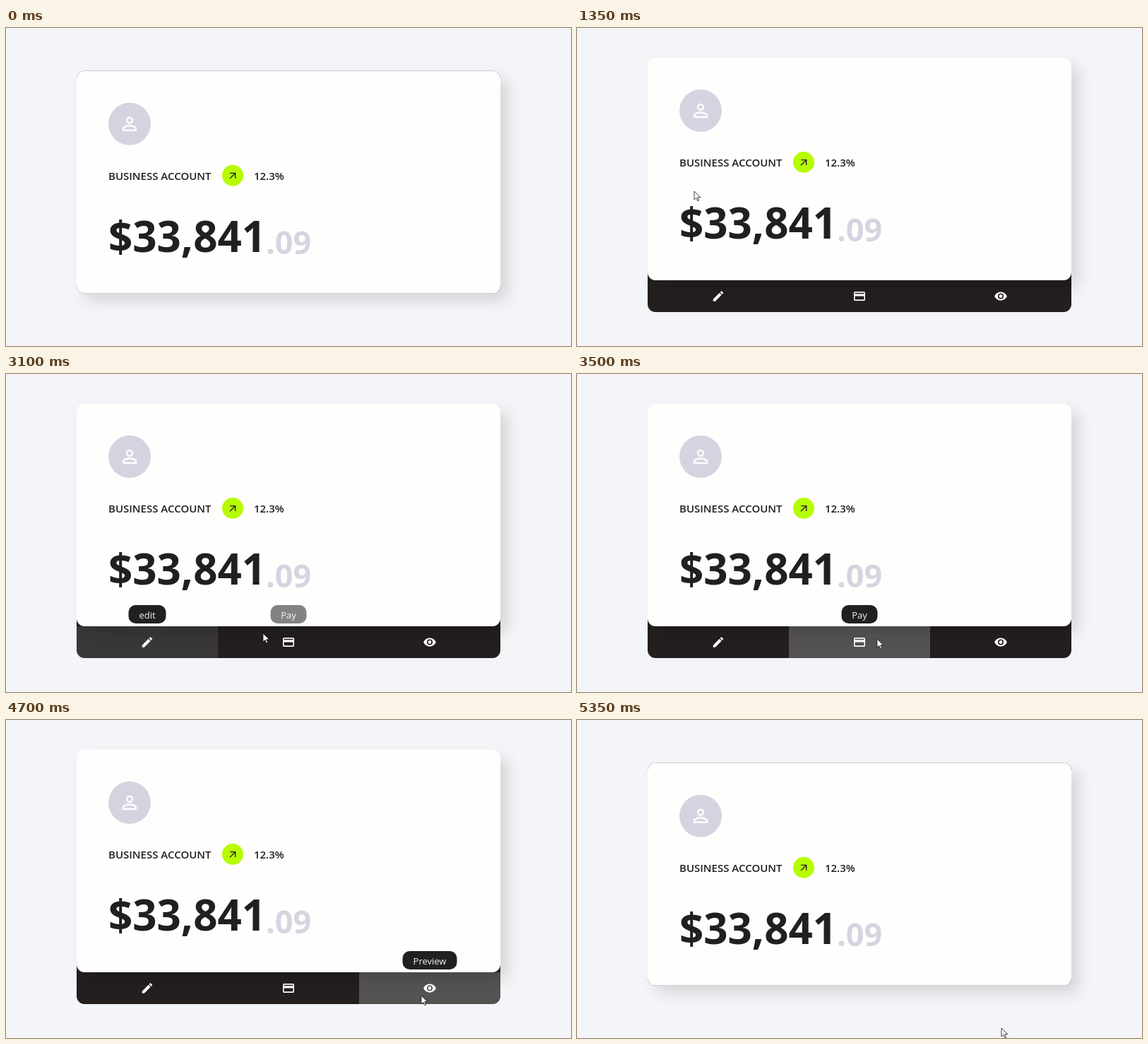
Recreate the animation shown at these times as an HTML page. Size 800 by 450 pixels, loop 5.45 s.

```html
<!DOCTYPE html>
<html lang="en">
<head>
<meta charset="utf-8">
<title>Account card</title>
<style>
  html, body { margin: 0; width: 100%; height: 100%; overflow: hidden; background: #f4f5f9; }
  svg { display: block; width: 800px; height: 450px; font-family: "Open Sans", "Noto Sans", sans-serif; }
  .panel { filter: drop-shadow(11px 11px 10px rgba(0, 0, 0, .12)); }
  .ink { fill: #221f20; }
  .label { font-size: 15px; font-weight: 600; }
  .amount { font-size: 60px; font-weight: 700; }
  .cents { font-size: 45px; font-weight: 700; fill: #d5d5e2; }
  .tip text { font-size: 13px; fill: #f6f5f4; text-anchor: middle; }
</style>
</head>
<body>
<svg viewBox="0 0 800 450">
  <defs>
    <clipPath id="round"><rect x="100" y="87" width="600" height="315" rx="11.25"/></clipPath>
  </defs>

  <!-- action bar, drawn in its open position -->
  <g id="bar">
    <rect x="100" y="87" width="600" height="315" rx="11.25" fill="#221f1e"/>
    <g id="buttons" clip-path="url(#round)" fill="#fff"></g>
    <g fill="#fffefc">
      <path transform="translate(200 379.5) scale(.8) translate(-12 -12)" d="M3 17.25V21h3.75L17.81 9.94l-3.75-3.75zM20.71 7.04a1 1 0 0 0 0-1.41l-2.34-2.34a1 1 0 0 0-1.41 0l-1.83 1.83 3.75 3.75z"/>
      <path transform="translate(400 379.5) scale(.8) translate(-12 -12)" d="M20 4H4a2 2 0 0 0-2 2v12a2 2 0 0 0 2 2h16a2 2 0 0 0 2-2V6a2 2 0 0 0-2-2zm0 14H4v-6h16zm0-10H4V6h16z"/>
      <path transform="translate(600 379.5) scale(.8) translate(-12 -12)" d="M12 4.5C7 4.5 2.73 7.61 1 12c1.73 4.39 6 7.5 11 7.5s9.27-3.11 11-7.5c-1.73-4.39-6-7.5-11-7.5zM12 17a5 5 0 1 1 0-10 5 5 0 0 1 0 10zm0-8a3 3 0 1 0 0 6 3 3 0 0 0 0-6z"/>
    </g>
  </g>

  <!-- card, drawn in its resting position -->
  <g id="card">
    <rect class="panel" x="100" y="60.75" width="600" height="315" rx="11.25" fill="#fffefc"/>
    <circle cx="175" cy="135.75" r="30" fill="#d4d4e1"/>
    <g transform="translate(175 135.75) scale(1.28) translate(-12 -12)" fill="none" stroke="#fffefc" stroke-width="1.9" stroke-linejoin="round">
      <circle cx="12" cy="8" r="3.05"/>
      <path d="M5 17c0-1.2 4-3 7-3s7 1.800 7 3v2H5z"/>
    </g>
    <text class="ink label" x="145" y="215">BUSINESS ACCOUNT</text>
    <circle cx="321" cy="208.75" r="15" fill="#b6fc02"/>
    <path class="ink" transform="translate(321.3 208.75) scale(.68) translate(-12 -12)" d="M6 6v2h8.590L5 17.590 6.410 19 16 9.410V18h2V6z"/>
    <text class="ink label" x="351" y="215">12.3%</text>
    <text class="ink amount" x="145" y="316.75">$33,841</text>
    <text class="cents" x="368" y="320.25">.09</text>
  </g>

  <g id="tips"></g>
  <path id="cursor" d="M0 0v12l2.800-2.600 2 4.400 1.900-.8-2-4.300h4z" fill="#fff" stroke="#111" stroke-width=".8" stroke-linejoin="round"/>
</svg>

<script>
const LOOP = 5450, STEP = 50;
const LIFT = 18.75, DROP = 26.25, GLOW = .23;

// time, x, y
const path = [
  [0, -20, 243], [350, -14, 243], [400, 4, 243], [550, 38, 243],
  [1000, 100, 239], [1350, 166, 231], [1650, 176, 238], [1900, 190, 310],
  [2000, 198, 354], [2200, 209, 381], [2500, 209, 381], [2750, 285, 376],
  [2950, 312, 371], [3100, 364, 367], [3300, 398, 372], [3500, 425, 375],
  [3650, 488, 371], [3900, 556, 366], [4200, 588, 380], [4400, 588, 390],
  [4700, 588, 390], [4850, 592, 415], [4950, 598, 433], [5100, 602, 437],
  [5350, 601, 436]
];

// tip and glow: fade-in start, fade-in end, fade-out start, fade-out end
const actions = [
  { name: "edit", x: 200, width: 53, tip: [2010, 2250, 3130, 3290], glow: [2180, 2340, 2970, 3220] },
  { name: "Pay", x: 400, width: 51, tip: [2970, 3206, 3890, 4080], glow: [3150, 3320, 3670, 3950] },
  { name: "Preview", x: 600, width: 77, tip: [3670, 3910, 4740, 4930], glow: [3855, 4030, 4740, 4930] }
];

const byId = id => document.getElementById(id);
const card = byId("card"), bar = byId("bar"), cursor = byId("cursor");

function add(parent, tag, attrs) {
  const el = document.createElementNS("http://www.w3.org/2000/svg", tag);
  for (const key in attrs) el.setAttribute(key, attrs[key]);
  return parent.appendChild(el);
}

for (const a of actions) {
  a.button = add(byId("buttons"), "rect", { x: a.x - 100, y: 357, width: 200, height: 45 });
  a.bubble = add(byId("tips"), "g", { class: "tip" });
  add(a.bubble, "rect", { class: "ink", x: a.x - a.width / 2, y: 327, width: a.width, height: 26, rx: 10 });
  add(a.bubble, "text", { x: a.x, y: 345.5 }).textContent = a.name;
}

const ramp = (t, from, to) => Math.min(1, Math.max(0, (t - from) / (to - from)));
const easeOut = p => 1 - (1 - p) ** 2;
const fade = (t, [a, b, c, d]) => ramp(t, a, b) - ramp(t, c, d);
const move = (el, x, y) => el.setAttribute("transform", `translate(${x} ${y})`);

function pointAt(t) {
  const i = path.findIndex(p => p[0] > t);
  if (i < 0) return path[path.length - 1].slice(1);
  const [t0, x0, y0] = path[i - 1], [t1, x1, y1] = path[i];
  const p = ramp(t, t0, t1);
  return [x0 + (x1 - x0) * p, y0 + (y1 - y0) * p];
}

function draw(t) {
  const open = easeOut(ramp(t, 1040, 1290)) - easeOut(ramp(t, 4730, 4950));
  move(card, 0, -LIFT * open);
  move(bar, 0, -DROP * (1 - open));
  for (const a of actions) {
    a.button.setAttribute("opacity", GLOW * fade(t, a.glow));
    a.bubble.setAttribute("opacity", fade(t, a.tip));
  }
  move(cursor, ...pointAt(t));
}

const start = performance.now();
function tick() {
  const t = (performance.now() - start) % LOOP;
  draw(Math.min(LOOP - 2 * STEP, Math.floor(t / STEP) * STEP));
  requestAnimationFrame(tick);
}
tick();
</script>
</body>
</html>
```
